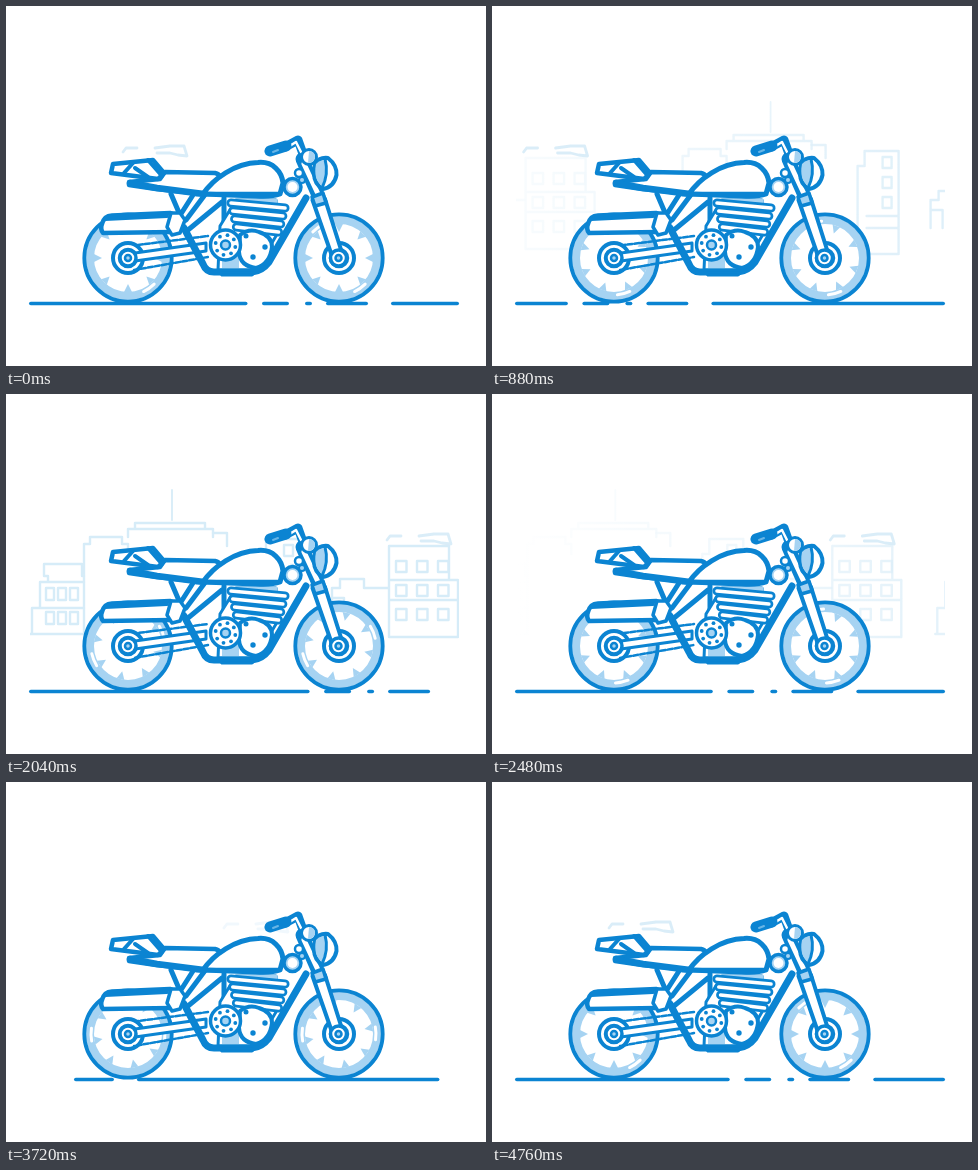
Animation of 480 by 360 pixels, one loop 4.8 s. Source, as an HTML page with a canvas:

```html
<!DOCTYPE html>
<html lang="en">
<head>
<meta charset="utf-8">
<title>Motorcycle ride</title>
<style>
html, body { margin: 0; width: 100%; height: 100%; overflow: hidden; background: #fff; }
canvas { display: block; width: 480px; height: 360px; }
</style>
</head>
<body>
<canvas id="stage" width="480" height="360"></canvas>
<script>
const ctx = document.getElementById('stage').getContext('2d');
const LOOP = 4800, STEP = 40, SKY_CYCLE = 4760, ROAD_CYCLE = 4740;
const BLUE = '#0b84d2', LIGHT = '#a6d3f2', SKY = '#d6ecf8';
const ROAD_PERIOD = 446, SKY_PERIOD = 462;

function shape(d, fill, stroke, width = 4) {
  const path = new Path2D(d);
  if (fill) { ctx.fillStyle = fill; ctx.fill(path); }
  if (stroke) { ctx.strokeStyle = stroke; ctx.lineWidth = width; ctx.stroke(path); }
}

function disc(x, y, r, fill, stroke, width = 4) {
  ctx.beginPath();
  ctx.arc(x, y, r, 0, 7);
  if (fill) { ctx.fillStyle = fill; ctx.fill(); }
  if (stroke) { ctx.strokeStyle = stroke; ctx.lineWidth = width; ctx.stroke(); }
}

function dots(x, y, count, ring, r, color, turn = 0) {
  for (let i = 0; i < count; i++) {
    const a = turn + i * Math.PI * 2 / count;
    disc(x + ring * Math.cos(a), y + ring * Math.sin(a), r, color);
  }
}

function curve(keys, t) {
  let i = 1;
  while (i < keys.length - 1 && t > keys[i][0]) i++;
  const [t0, a] = keys[i - 1], [t1, b] = keys[i];
  return a + (b - a) * Math.min(1, (t - t0) / (t1 - t0));
}

const skyFade = [[0, 0], [400, .8], [1400, .8], [1900, 1],
  [2200, 1], [2700, .4], [3000, 0], [4760, 0]];
const roofFade = [[0, .9], [3000, .9], [3720, .35], [4760, .9]];

function windows(x, y, cols, rows, dx, dy, w, h) {
  for (let c = 0; c < cols; c++)
    for (let r = 0; r < rows; r++) ctx.strokeRect(x + c * dx, y + r * dy, w, h);
}

function block() {
  const outline = d => shape(d, null, SKY, 2.4);
  shape('M0 96V126', null, SKY, 1.8);
  outline('M-37 135V129H33V135H-37M-44 143V135H41V143');
  outline('M-88 238V150H-82V143H-50V150H-44V160M41 139H55V152');
  outline('M-140 240V214H-132V188H-124V182H-128V170H-90V182H-88M-132 188H-88M-138 214H-88M-142 240H-88');
  windows(-126, 194, 3, 2, 12, 24, 8, 12);
  outline('M87 243V160H94V145H128V248H87M96 210H128M96 222H128');
  windows(112, 151, 1, 3, 14, 20, 9, 11);
  outline('M160 222V194H168V185H192V194H216M160 204H172V222');
  outline('M217 243V152H277V186H286V243ZM217 186H277M217 206H286');
  windows(224, 167, 3, 3, 21, 24, 10.5, 11);
}

// Haze keeps the far side of the town faint until it is fully in view.
function haze(amount) {
  const veil = ctx.createLinearGradient(24, 0, 430, 0);
  veil.addColorStop(0, `rgba(255,255,255,${amount})`);
  veil.addColorStop(1, 'rgba(255,255,255,0)');
  ctx.fillStyle = veil;
  ctx.fillRect(0, 90, 480, 165);
}

function skyline(t) {
  const fade = curve(skyFade, t);
  const eachBlock = draw => {
    for (let k = -1; k < 2; k++) {
      ctx.save();
      ctx.translate(364 - SKY_PERIOD * (t / SKY_CYCLE - k), 0);
      draw();
      ctx.restore();
    }
  };
  ctx.save();
  ctx.beginPath();
  ctx.rect(24, 90, 429, 165);
  ctx.clip();
  ctx.globalAlpha = fade;
  eachBlock(block);
  ctx.globalAlpha = 1;
  haze(Math.min(1, (1 - fade) * 4));
  ctx.globalAlpha = curve(roofFade, t);
  eachBlock(() => shape('M215 146L218 142H229M247 142L262 140H276L279 150L270 149L262 147H249', null, SKY, 2.8));
  ctx.restore();
}

function roadPiece(from, to) {
  if (to - from < 3) return;
  ctx.beginPath();
  ctx.roundRect(from, 295.7, to - from, 3.6, 1.8);
  ctx.fill();
}

function road(t) {
  ctx.fillStyle = BLUE;
  for (let k = 0; k < 4; k++) {
    const x = ROAD_PERIOD * (k - 2 * t / ROAD_CYCLE);
    if (x - 61 < 436) roadPiece(Math.max(23, x - 61), Math.min(453, x + 241.5));
    for (const [a, b] of [[256, 283], [299, 306], [320, 362]])
      roadPiece(Math.max(68, x + a), Math.min(436, x + b));
  }
}

function wheel(x, y, turn) {
  disc(x, y, 44, '#fff');
  disc(x, y, 38, null, LIGHT, 8);
  ctx.save();
  ctx.translate(x, y);
  ctx.rotate(turn);
  for (let i = 0; i < 8; i++) {
    ctx.rotate(Math.PI / 4);
    shape('M26 0L34 -4V4Z', LIGHT);
    if (i % 4 === 0) {
      ctx.beginPath();
      ctx.arc(0, 0, 37, 0, .35);
      ctx.strokeStyle = '#fff';
      ctx.lineWidth = 3;
      ctx.stroke();
    }
  }
  ctx.restore();
  disc(x, y, 43.7, null, BLUE, 3.8);
  disc(x, y, 15, '#fff', BLUE, 4);
  disc(x, y, 8.5, '#fff', BLUE, 3.5);
}

function drivetrain(t) {
  ctx.setLineDash([5, 2]);
  ctx.lineDashOffset = t * .02;
  shape('M132 239L202 230M128 264L202 251', null, BLUE, 2.5);
  ctx.setLineDash([]);
  shape('M122 248L200 237V245L122 256Z', '#fff', BLUE, 3);
  disc(122, 252, 8, '#fff', BLUE, 3.5);
  disc(122, 252, 3, LIGHT, BLUE, 2.5);
}

function frameAndEngine() {
  shape('M165 188L174 209M187 189L173 211M198 190L180 214M218 192V222M216 196L182 224', null, BLUE, 5);
  shape('M178 222L197 258Q200 266 208 266H246Q256 265 263 256L300 192', null, BLUE, 7);
  shape('M214 220L230 194L270 194L270 230L250 264H212Z', '#fff', BLUE, 3);
  shape('M223 193H271V199H223ZM216 246H233V262H216Z', LIGHT);
  shape('M212 264H251L246 269H216Z', BLUE, BLUE, 3);
  for (let i = 0; i < 4; i++) {
    const inset = i * 1.8, y = 197 + i * 8;
    const d = `M${225 + inset} ${y}L${279 - inset * 1.2} ${y + 5}`;
    shape(d, null, BLUE, 9);
    shape(d, null, '#fff', 3.6);
  }
  shape('M234 229Q243 222 253 226Q266 230 266 241Q264 258 250 262Q234 260 233 246Z', '#fff', BLUE, 4);
  disc(247, 251, 2.7, BLUE);
  disc(259, 241, 2.7, BLUE);
  disc(240, 230, 2.5, BLUE);
  disc(219.5, 239, 15, '#fff', BLUE, 3.5);
  dots(219.5, 239, 8, 10, 1.9, BLUE, .2);
  disc(219.5, 239, 4.5, LIGHT, BLUE, 2.5);
}

function bodywork() {
  shape('M96 218Q98 210 106 209.5L164 207Q174 210 177 219Q176 226 166 226L97 227Q94 223 96 218Z', '#fff', BLUE, 4.5);
  shape('M99 213L161 210', null, BLUE, 4);
  shape('M165 207H174L179 214L174 227L166 229L161 221Z', '#fff', BLUE, 3.5);
  shape('M123 176L154 173L159 166L209 167Q217 169 211 175L198 188L150 183L123 179Z', '#fff', BLUE, 4.5);
  shape('M124 177L151 182L198 188', null, BLUE, 6.5);
  shape('M107 158L147 154L158 167L152 173L105 167Z', '#fff', BLUE, 4.5);
  shape('M127 157L118 167M142 154L156 170M129 162L142 171', null, BLUE, 4);
  shape('M197 188C207 173 229 157 252 156.5C267 155 276 166 277 177L274 188Q266 191 250 190Z', '#fff', BLUE, 5);
  shape('M190 188H272', null, BLUE, 4.5);
}

function frontEnd() {
  shape('M296 153L315 196', null, BLUE, 13);
  shape('M298 158L313 190', null, '#fff', 5);
  shape('M306.5 194L326 250L337 250L319 193Z', '#fff', BLUE, 4);
  shape('M306 191L317 187L320 197L309 200Z', LIGHT, BLUE, 3.5);
  disc(332.5, 252, 8, '#fff', BLUE, 3.5);
  disc(332.5, 252, 3, LIGHT, BLUE, 2.5);
  disc(286.5, 181, 8.5, LIGHT, BLUE, 3.5);
  disc(286.5, 181, 5, '#fff');
  disc(293, 167, 4, '#fff', BLUE, 2.5);
  disc(296, 174, 3, LIGHT, BLUE, 2);
  shape('M309 158Q313 151 322 152Q331 159 330.5 169Q328 181 317 183Q308 178 308 167Z', '#fff', BLUE, 4);
  shape('M310 158Q314 153 318 155Q321 168 316 180Q307 173 310 158Z', LIGHT);
  shape('M319 153Q323 168 316 182', null, BLUE, 3);
  shape('M279 141L292 134L297 148', null, BLUE, 9);
  shape('M282 141L290 136L295 146', null, '#fff', 2.5);
  shape('M264 145L280 140', null, BLUE, 11);
  shape('M267 146L272 144', null, '#68b5e6', 2);
  disc(303, 151, 7.5, '#fff', BLUE, 3);
  shape('M303 145Q310 146 309 152Q307 157 302 157Z', LIGHT);
}

function draw(now) {
  const t = Math.floor((now % LOOP) / STEP) * STEP;
  const turn = t / SKY_CYCLE * Math.PI * 6;
  ctx.fillStyle = '#fff';
  ctx.fillRect(0, 0, 480, 360);
  ctx.lineCap = 'round';
  ctx.lineJoin = 'round';
  skyline(t);
  shape('M125 180L160 168L275 160L302 190L330 235L260 268H200L160 250V207H95V225H150Z', '#fff');
  road(t);
  wheel(122, 252, turn);
  wheel(333, 252, turn);
  drivetrain(t);
  frameAndEngine();
  bodywork();
  frontEnd();
  requestAnimationFrame(() => draw(performance.now() - start));
}

const start = performance.now();
draw(0);
</script>
</body>
</html>
```
